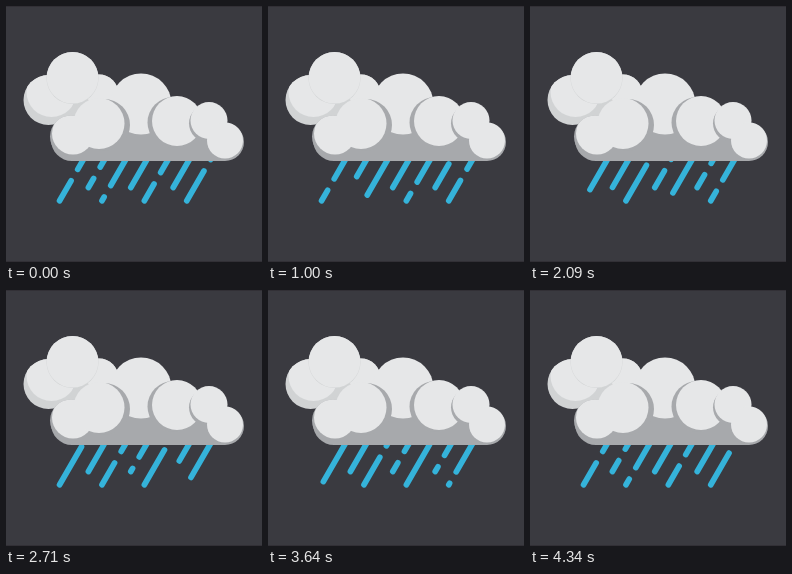
An HTML page with a canvas that plays this animation: 256x256 px, repeating every 4420 ms.

```html
<!DOCTYPE html>
<html lang="en">
<head>
<meta charset="utf-8">
<title>Rain cloud</title>
<style>
  html, body { margin: 0; width: 100%; height: 100%; overflow: hidden; background: #3a3a40; }
  canvas { display: block; width: 100vw; height: 100vh; }
</style>
</head>
<body>
<canvas id="stage" width="256" height="256"></canvas>
<script>
const canvas = document.getElementById('stage');
const ctx = canvas.getContext('2d');

const LOOP = 4420;
const STEP = 77.74;
const PITCH = 52;         // vertical distance between dashes on one track
const DASH = 40.5;
const SLANT = Math.tan(Math.PI / 6);
const RAIN_TOP = 149;
const CLOUD_BASE = 155;
const COLORS = {
  sky: '#3a3a40', edge: '#323036', rain: '#35b3da',
  light: '#e6e7e8', backShade: '#d1d3d4', shade: '#a7a9ac'
};
// Lower end of a dash on each track at the start of the loop
const DASH_ENDS = [163.3, 161, 179.5, 185, 166.5, 189, 153.5];

function disc(x, y, r, color) {
  ctx.fillStyle = color;
  ctx.beginPath();
  ctx.arc(x, y, r, 0, Math.PI * 2);
  ctx.fill();
}

// A disc whose lit part is the same disc shifted and clipped to it
function puff(x, y, r, dx, dy, shade) {
  disc(x, y, r, shade);
  ctx.save();
  ctx.beginPath();
  ctx.arc(x, y, r, 0, Math.PI * 2);
  ctx.clip();
  disc(x + dx, y + dy, r, COLORS.light);
  ctx.restore();
}

function fallen(time) {
  if (time < 70) return 0;
  if (time < 205) return 12;
  return 31.5 + 8.2 * Math.floor((time - 205) / STEP);
}

function drawRain(distance) {
  ctx.strokeStyle = COLORS.rain;
  ctx.lineWidth = 5.7;
  ctx.lineCap = 'round';
  DASH_ENDS.forEach((start, i) => {
    const limit = i % 2 ? 181.5 : 194.7;
    const xAt = y => 76.5 + 21.2 * i - (y - CLOUD_BASE) * SLANT;
    let end = (start + distance) % PITCH + PITCH * 5;
    for (; end > RAIN_TOP; end -= PITCH) {
      const from = Math.max(end - DASH, RAIN_TOP);
      const to = Math.min(end, limit);
      if (from > to) continue;
      ctx.beginPath();
      ctx.moveTo(xAt(from), from);
      ctx.lineTo(xAt(to), to);
      ctx.stroke();
    }
  });
}

function drawBackCloud() {
  const { light, backShade } = COLORS;
  disc(70, 102, 22, backShade);
  disc(82, 100, 18, backShade);
  puff(93, 88, 19.5, 3, -8, backShade);
  puff(42.5, 94, 25, 3, -8, backShade);
  disc(66.5, 72, 26, backShade);
  disc(66.5, 71.8, 25.8, light);
}

function drawFrontCloud() {
  const { light, shade } = COLORS;
  disc(66, 134, 21, shade);
  disc(219, 136, 19, shade);
  ctx.fillRect(66, 120, 153, CLOUD_BASE - 120);
  disc(135, 98, 30.5, light);
  disc(98, 119, 26, shade);
  puff(65, 130.5, 21, 2, -3, shade);
  disc(93, 117.5, 25.5, light);
  disc(167, 116.5, 25.5, shade);
  disc(171, 115, 25, light);
  disc(201.5, 117.3, 18.5, shade);
  disc(203, 114.5, 18.5, light);
  disc(219, 134.5, 18, light);
}

function draw(time) {
  const ratio = window.devicePixelRatio || 1;
  const width = Math.round(innerWidth * ratio);
  const height = Math.round(innerHeight * ratio);
  if (canvas.width !== width || canvas.height !== height) {
    canvas.width = width;
    canvas.height = height;
  }
  ctx.setTransform(width / 256, 0, 0, height / 256, 0, 0);
  ctx.fillStyle = COLORS.sky;
  ctx.fillRect(0, 0, 256, 256);
  ctx.fillStyle = COLORS.edge;
  ctx.fillRect(0, 0, 256, 1);
  ctx.fillRect(0, 255, 256, 1);
  drawRain(fallen(time));
  drawBackCloud();
  drawFrontCloud();
}

const began = performance.now();
function tick() {
  draw((performance.now() - began) % LOOP);
  requestAnimationFrame(tick);
}
tick();
</script>
</body>
</html>
```
